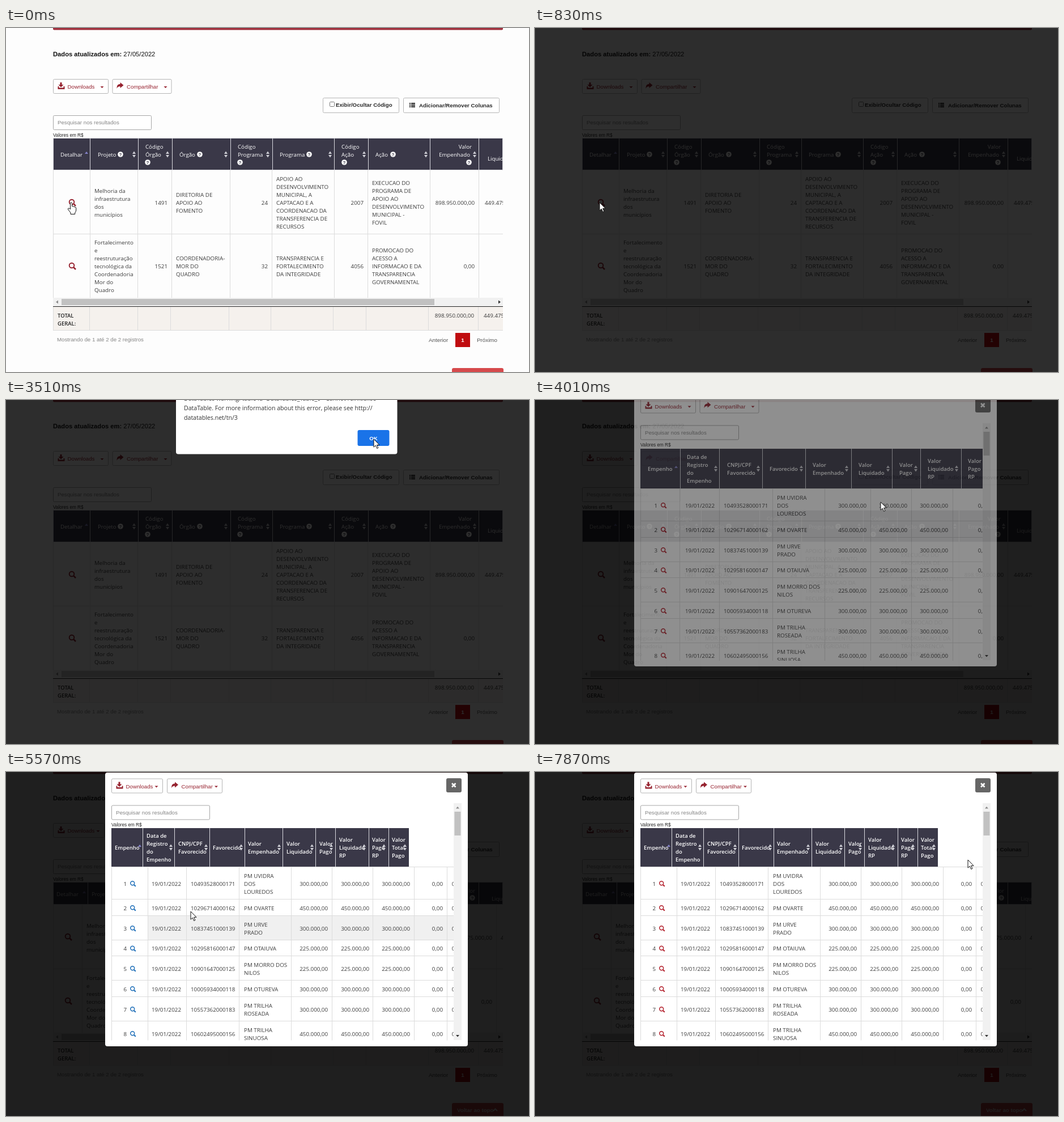
These frames come from a looping animation (923 px wide and 607 px high, 7990 ms). An HTML page:

```html
<!DOCTYPE html>
<html lang="pt-BR">
<head>
<meta charset="utf-8">
<title>Consulta de despesas</title>
<style>
html, body { margin: 0; width: 100%; height: 100%; overflow: hidden; background: #fdfdfd; }
svg { display: block; width: 923px; height: 607px; }
text { white-space: pre; }
.b { font: 9.8px "Open Sans", "Noto Sans", sans-serif; fill: #3c3c3c; }
.h { font: 500 9.7px "Open Sans", "Noto Sans", sans-serif; fill: #fff; }
.m { font: 600 9.5px "Open Sans", "Noto Sans", sans-serif; fill: #fff; }
.tot { font: 600 9.5px "Open Sans", "Noto Sans", sans-serif; fill: #222; }
.al { font: 10.6px "Open Sans", "Noto Sans", sans-serif; fill: #333; }
.q { font: bold 8px "Liberation Sans", Arial, sans-serif; fill: #3a3848; }
.d { font: 11.2px "Liberation Sans", Arial, sans-serif; fill: #111; }
.btn { font: 9.7px "Liberation Sans", Arial, sans-serif; fill: #96222f; }
.bold { font: bold 9.7px "Liberation Sans", Arial, sans-serif; fill: #2a2a2a; }
.grey { font: 9.7px "Liberation Sans", Arial, sans-serif; fill: #858585; }
.pg { font: 9.8px "Liberation Sans", Arial, sans-serif; fill: #555; }
.sm { font: 8.2px "Liberation Sans", Arial, sans-serif; fill: #222; }
.w { font: bold 9.7px "Liberation Sans", Arial, sans-serif; fill: #fff; }
</style>
</head>
<body>
<svg id="stage" viewBox="0 0 923 607" xmlns="http://www.w3.org/2000/svg"></svg>
<script>
const LOOP = 7990, WINE = '#96222f', DARK = '#3a3848', LINE = '#dcdcdc', RULE = '#d8d8de';

// ---- drawing helpers ----
const rect = (x, y, w, h, fill, more = '') =>
  `<rect x="${x}" y="${y}" width="${w}" height="${h}" fill="${fill}" ${more}/>`;
const path = (d, fill, more = '') => `<path d="${d}" fill="${fill}" ${more}/>`;
const group = (id, body, more = '') => `<g id="${id}" ${more}>${body}</g>`;
const vlines = (xs, y1, y2, color) =>
  path(xs.map(x => `M${x} ${y1}V${y2}`).join(''), 'none', `stroke="${color}"`);
const hline = (x1, x2, y, color) => path(`M${x1} ${y}H${x2}`, 'none', `stroke="${color}"`);

// y is the middle of the first line; "|" splits lines
function text(x, y, str, cls, anchor = 'start', step = 14) {
  return str.split('|').map((s, i) =>
    `<text x="${x}" y="${y + i * step + 3.5}" class="${cls}" text-anchor="${anchor}">${s}</text>`).join('');
}
const right = (x, y, str, cls = 'b') => text(x, y, str, cls, 'end');
const mid = (x, y, str, cls) => text(x, y, str, cls, 'middle');

const box = (x, y, w, h, stroke = '#b5b5b5') =>
  rect(x + .5, y + .5, w - 1, h - 1, '#fff', `rx="2" stroke="${stroke}"`);
const caret = (x, y) => path(`M${x - 3} ${y - 1.5}h6l-3 3z`, WINE);
const help = (x, y) => `<circle cx="${x}" cy="${y}" r="4.8" fill="#fff"/>` + mid(x, y - .6, '?', 'q');
const sort = (x, y) => path(`M${x - 3} ${y - 1}h6l-3 -4.5zM${x - 3} ${y + 1}h6l-3 4.5z`, '#cfcfd6');
const sortUp = (x, y) => path(`M${x - 3} ${y}h6l-3 -4z`, '#8583c9');
const lens = (x, y, k, color) =>
  `<g transform="translate(${x} ${y}) scale(${k})" fill="none" stroke="${color}">
  <circle cx="-1" cy="-1" r="4.3" stroke-width="1.9"/><path d="M2.4 2.4L6 6" stroke-width="2.5"/></g>`;

function buttons(x, y, tight) {
  const cut = tight ? 7 : 0, x2 = x + 104.5 - cut + (tight ? .5 : 0);
  return box(x, y, 98 - cut, 26) + box(x2, y, 105 - cut, 26)
    + path(`M${x + 12.5} ${y + 6}h3v4h3l-4.500 4.500l-4.500-4.500h3z`, WINE)
    + path(`M${x + 8.500} ${y + 13}v5h12v-5h-2v2.500h-8v-2.500z`, WINE)
    + text(x + 25.5, y + 13.5, 'Downloads', 'btn') + caret(x + 86.5 - cut, y + 14.5)
    + path(`M${x2 + 8} ${y + 17}c0-6 2-8 6-8v-3l6 5l-6 5v-3c-3 0-5 1-6 4z`, WINE)
    + text(x2 + 25.5, y + 13.5, 'Compartilhar', 'btn') + caret(x2 + 94 - cut, y + 14.5);
}
const search = (x, y) => box(x, y, 174, 26, '#a6a6a6') + text(x + 8, y + 12.5, 'Pesquisar nos resultados', 'grey')
  + text(x, y + 34, 'Valores em R$', 'sm');

// ---- main page ----
const PROJ = ['Melhoria da|infraestrutura|dos|municípios',
  'Fortalecimento|e|reestruturação|tecnológica da|Coordenadoria|Mor do|Quadro'];

// label, x, y, help x, help y, sort x
const HEAD = [
  ['Projeto', 162, 223, 202, 223, 226],
  ['Código|Órgão', 246, 209, 250, 237, 285],
  ['Órgão', 306, 223, 342, 223, 388],
  ['Código|Programa', 409, 209, 413, 237, 462],
  ['Programa', 483, 223, 535, 223, 572],
  ['Código|Ação', 592, 209, 597, 237, 632],
  ['Ação', 652, 223, 683, 223, 741]
];
const headBar = h => rect(83.5, 194.5, 793, h, DARK, `stroke="${RULE}"`);

function wideTable() {
  const cols = [148.5, 232.5, 292.5, 395.5, 469.5, 579.5, 638.5, 748.5, 834.5];
  let s = headBar(56) + vlines([148.5, 233.5, 293.5, 396.5, 470.5, 579.5, 639.5, 748.5, 834.5], 195, 250, RULE)
    + text(96, 223, 'Detalhar', 'h') + sortUp(142, 222);
  for (const [label, x, y, hx, hy, sx] of HEAD) s += text(x, y, label, 'h') + help(hx, hy) + sort(sx, 223);
  s += right(822, 209, 'Valor', 'h') + right(819, 223, 'Empenhado', 'h') + help(817, 237) + sort(827, 223)
    + text(850, 230, 'Liquidado', 'h') + vlines([83.5, ...cols], 251, 476, LINE) + hline(83, 878, 363.5, LINE);
  s += lens(117, 308, 1, WINE) + lens(117, 420, 1, WINE)
    + text(156, 287, PROJ[0], 'b') + text(156, 378.5, PROJ[1], 'b')
    + right(285, 308, '1491') + right(285, 420, '1521')
    + text(300, 294, 'DIRETORIA DE|APOIO AO|FOMENTO', 'b') + text(300, 406, 'COORDENADORIA-|MOR DO|QUADRO', 'b')
    + right(462, 308, '24') + right(462, 420, '32')
    + text(477, 266, 'APOIO AO|DESENVOLVIMENTO|MUNICIPAL, A|CAPTACAO E A|COORDENACAO DA|TRANSFERENCIA DE|RECURSOS', 'b')
    + text(477, 406, 'TRANSPARENCIA E|FORTALECIMENTO|DA INTEGRIDADE', 'b')
    + right(631, 308, '2007') + right(631, 420, '4056')
    + text(646, 273, 'EXECUCAO DO|PROGRAMA DE|APOIO AO|DESENVOLVIMENTO|MUNICIPAL -|FOVIL', 'b')
    + text(646, 392, 'PROMOCAO DO|ACESSO A|INFORMACAO E DA|TRANSPARENCIA|GOVERNAMENTAL', 'b')
    + right(827, 308, '898.950.000,00') + right(827, 420, '0,00') + text(845, 308, '449.475.000,00', 'b');
  return s;
}

function tightTable() {
  return headBar(39) + vlines([144.5, 834.5], 195, 233, RULE)
    + text(89, 215, 'Detalhar', 'h') + sortUp(138, 214) + text(151, 215, 'Projeto', 'h')
    + right(828, 209, 'Valor', 'h') + help(823, 222) + text(857, 223, 'Liquidado', 'h')
    + vlines([83.5, 134.5, 865.5], 234, 460, LINE) + hline(83, 878, 347.5, LINE)
    + lens(110, 291, 1, WINE) + lens(110, 404, 1, WINE)
    + text(142, 271, PROJ[0], 'b') + text(142, 363, PROJ[1], 'b')
    + right(858, 292, '449.475.000,00') + right(858, 405, '0,00') + text(873, 292, '449.475.000,00', 'b');
}

function footer() {
  return rect(83, 476, 795, 15, '#f1f1f1') + rect(98, 478, 658, 11, '#c1c1c1')
    + path('M92 480.500v6l-4-3z', '#8a8a8a') + path('M869 480.500v6l4-3z', '#333')
    + rect(83, 491, 795, 43, '#f5f1ed') + hline(83, 878, 491.5, '#222') + hline(83, 878, 533.5, LINE)
    + vlines([83.5, 147.5, 232.5, 290.5, 393.5, 467.5, 577.5, 635.5, 745.5, 833.5], 492, 534, LINE)
    + text(91, 507, 'TOTAL|GERAL:', 'tot')
    + right(826, 507, '898.950.000,00') + text(843, 507, '449.475.000,00', 'b');
}

function page(id, tight) {
  const list = [0, 3, 6].map(i => rect(712, 132 + i, 2, 2, '#222') + rect(715, 132 + i, 7, 2, '#222')).join('');
  const up = tight ? -16 : 0;
  return group(id, rect(0, 0, 923, 607, '#fdfdfd')
    + rect(83, -6, 794, 9.5, '#a0303d', 'rx="2"')
    + text(83, 46.5, '<tspan font-weight="bold">Dados atualizados em:</tspan> 27/05/2022', 'd')
    + buttons(83, 90, tight)
    + box(559, 123, 135, 27) + rect(571.5, 130.5, 8, 8, '#fff', 'stroke="#777" rx="1"')
    + text(582, 135.5, 'Exibir/Ocultar Código', 'bold')
    + box(701, 123, 170, 27) + list + text(729, 136, 'Adicionar/Remover Colunas', 'bold')
    + search(83, 154)
    + `<g clip-path="url(#pageClip)">${tight ? tightTable() : wideTable()}<g transform="translate(0 ${up})">${footer()}</g></g>`
    + `<g transform="translate(0 ${up})">`
    + text(90, 549.5, 'Mostrando de 1 até 2 de 2 registros', 'grey')
    + text(746, 550, 'Anterior', 'pg') + text(831, 550, 'Próximo', 'pg')
    + rect(793, 538, 26, 25, '#c00c10') + mid(806, 550, '1', 'w')
    + rect(787, 600, 91, 25, '#d64a4c', 'rx="3"')
    + text(796, 612, 'Voltar ao topo', 'w') + path('M860 614l3.500-3.500l3.500 3.500', 'none', 'stroke="#fff" stroke-width="2"')
    + '</g>');
}

// ---- detail window ----
// name, id number, value in thousands
const ROWS = [
  ['PM UVIDRA|DOS|LOUREDOS', '10493528000171', 300], ['PM OVARTE', '10296714000162', 450],
  ['PM URVE|PRADO', '10837451000139', 300], ['PM OTAIUVA', '10295816000147', 225],
  ['PM MORRO DOS|NILOS', '10901647000125', 225], ['PM OTUREVA', '10005934000118', 300],
  ['PM TRILHA|ROSEADA', '10557362000183', 300], ['PM TRILHA|SINUOSA', '10602495000156', 450]
];
const HEIGHTS = [57, 29, 43, 28, 43, 29, 43, 43];
const TITLES = ['Empenho', 'Data de|Registro|do|Empenho', 'CNPJ/CPF|Favorecido', 'Favorecido', 'Valor|Empenhado',
  'Valor|Liquidado', 'Valor|Pago', 'Valor|Liquidado|RP', 'Valor|Pago|RP', 'Valor|Total|Pago'];

const WIDE = {
  id: 'wide', top: -14, end: 790, head: [86, 70], body: 157,
  heads: [256.5, 325.5, 401.5, 477.5, 558.5, 630.5, 680.5, 752.5],
  titles: [199, 268, 339, 414, 490, 571, 643, 693, 764],
  sorts: [249, 319, 394, 470, 550, 623, 672, 744, 795],
  cols: [255.5, 325.5, 419.5, 511.5, 592.5, 664.5, 737.5],
  num: 216, date: 265, doc: 333, name: 427, vals: [585, 657, 729], zeros: [801]
};
const TIGHT = {
  id: 'tight', top: 0, end: 711, head: [99, 68], body: 168,
  heads: [241.5, 297.5, 359.5, 421.5, 488.5, 546.5, 581.5, 640.5, 675.5],
  titles: [192, 248, 304, 365, 427, 495, 553, 588, 646, 681],
  sorts: [236, 291, 353, 415, 482, 540, 574, 632, 667, 704],
  cols: [250.5, 318.5, 411.5, 503.5, 575.5, 647.5, 720.5, 778.5],
  num: 213, date: 257, doc: 326, name: 420, vals: [568, 641, 713], zeros: [771, 806]
};

function modal(L) {
  const y0 = L.top, [hy, hh] = L.head, cy = hy + hh / 2;
  let head = rect(186, hy, L.end - 186, hh, DARK) + vlines(L.heads, hy, hy + hh, RULE);
  L.titles.forEach((x, i) => {
    const n = TITLES[i].split('|').length;
    head += text(x, cy - (n - 1) * 7, TITLES[i], 'm') + (i ? sort(L.sorts[i], cy) : sortUp(L.sorts[0], cy - 1));
  });
  let y = L.body, rows = hline(186, 790, y - .5, LINE);
  ROWS.forEach(([name, doc, k], i) => {
    const h = HEIGHTS[i], c = y + h / 2 + .5, n = name.split('|').length;
    rows += rect(L.cols[0], y, 790 - L.cols[0], h, '#f0f0f0', `data-row="${i + 1}"`)
      + right(L.num, c, String(i + 1)) + lens(L.num + 11, c, .8, 'currentColor')
      + text(L.date, c, '19/01/2022', 'b') + text(L.doc, c, doc, 'b') + text(L.name, c - (n - 1) * 7, name, 'b')
      + L.vals.map(x => right(x, c, k + '.000,00')).join('') + L.zeros.map(x => right(x, c, '0,00')).join('')
      + hline(186, 790, y + h - .5, LINE);
    y += h;
  });
  rows += vlines([186.5, ...L.cols], L.body, 480, LINE);
  return group(L.id,
    rect(175, y0 + 1, 640, 483, '#fff', 'rx="4"') + buttons(186, y0 + 11.5, L === TIGHT)
    + rect(777, y0 + 11, 27, 25, '#666', 'rx="3"')
    + path(`M787 ${y0 + 20}l6.500 6.500m0 -6.500l-6.500 6.500`, 'none', 'stroke="#fff" stroke-width="2.6"')
    + search(186, y0 + 58.5)
    + `<g clip-path="url(#${L.id}Clip)">${rows}${head}</g>`
    + rect(790, y0 + 55, 14, 418, '#f1f1f1') + rect(791.5, y0 + 70, 11, 42, '#c1c1c1')
    + path(`M794 ${y0 + 64.5}h6l-3-3.500z`, '#8a8a8a') + path(`M794 ${y0 + 464}h6l-3 3.500z`, '#333'));
}

// ---- alert and pointers ----
const alertBox = () => group('alert', rect(300, -60, 390.5, 155.5, '#fff', 'rx="4"')
  + text(314, -3, 'DataTables warning: table id=DataTables_Table_0 - Cannot reinitialise|DataTable. For more information about this error, please see http://|datatables.net/tn/3', 'al', 'start', 17.2)
  + rect(620, 52, 57, 30, '#fff', 'id="ring" rx="4" stroke="#1a66cc" stroke-width="2"')
  + rect(620.5, 53, 56, 28, '#1a73e8', 'id="ok" rx="3"') + mid(648.5, 67, 'OK', 'w'));

const pointers = () => group('cursor',
  path('M0 0V14.200L3.300 11.200L5.700 16.500L7.900 15.500L5.600 10.300H10Z', '#fff', 'id="arrow" stroke="#111"')
  + path('M-1.500 9V1.500a1.500 1.500 0 0 1 3 0V6.500q2.500-1 2.700 .8q2.300-.8 2.500 1q2-.4 2 1.500V13q0 3-2 5v2.500H-1V18L-5.500 12q-.5-2 1.200-2q1.500 0 2.800 2z',
    '#fff', 'id="hand" stroke="#111"')
  + path('M-3 -7.500q3 0 3 1.500q0-1.500 3-1.500M0-6V6M-3 7.500q3 0 3-1.500q0 1.500 3 1.500', 'none', 'id="beam" stroke="#222" stroke-width="1.2"'));

const clip = (id, x, y, w, h) => `<clipPath id="${id}">${rect(x, y, w, h, '#fff')}</clipPath>`;
const stage = document.getElementById('stage');
stage.innerHTML = '<defs>' + clip('pageClip', 83, 190, 794, 345)
  + clip('wideClip', 186, 80, 604, 380) + clip('tightClip', 186, 95, 604, 378.5) + '</defs>'
  + page('page', false) + page('pageTight', true)
  + rect(0, 0, 923, 607, '#000', 'id="shade"') + alertBox() + modal(WIDE) + modal(TIGHT) + pointers();

// ---- timeline ----
const CURSOR = [
  [0, 'hand', 115, 308], [710, 'arrow', 114, 308], [2610, 'arrow', 132, 295],
  [2750, 'arrow', 230, 250], [2870, 'arrow', 400, 165], [3000, 'arrow', 560, 95], [3120, 'arrow', 643, 64],
  [3260, 'arrow', 649, 69], [4010, 'arrow', 610, 180], [4160, 'beam', 568, 246], [4280, 'beam', 530, 249],
  [4410, 'beam', 480, 253], [4530, 'beam', 440, 255], [4650, 'beam', 410, 257], [4770, 'beam', 392, 257],
  [5310, 'arrow', 387, 250], [5570, 'arrow', 326, 246], [5700, 'arrow', 270, 230], [5850, 'arrow', 202, 181],
  [5990, 'arrow', 192, 160], [6110, 'arrow', 201, 143], [6260, 'arrow', 330, 150], [6380, 'arrow', 501, 150],
  [6530, 'arrow', 620, 142], [6660, 'arrow', 727, 130], [6800, 'arrow', 700, 109], [6930, 'arrow', 751, 118],
  [7070, 'arrow', 745, 196], [7210, 'arrow', 770, 160], [7340, 'arrow', 779, 115], [7480, 'arrow', 711, 113],
  [7610, 'arrow', 784, 153], [7730, 'arrow', 743, 122], [7870, 'arrow', 764, 155]
];
const SHADE = [[0, 0], [710, .3], [830, .82], [4010, .88]];
const HOVER = [[0, 0], [4160, 1], [4280, 2], [4650, 3], [5700, 2], [5850, 1], [5990, 0], [7070, 1], [7210, 0]];
const ALERT = [[0, 0], [1620, .88], [1770, 1], [3640, .5], [3760, 0]];
const MODAL = [[0, 0], [4010, .5], [4160, 1]];

const at = (steps, t) => steps.findLast(s => s[0] <= t);
const $ = id => document.getElementById(id);
const show = (id, on) => $(id).setAttribute('display', on ? 'inline' : 'none');
const set = (id, name, v) => $(id).setAttribute(name, v);
const hoverRects = [...stage.querySelectorAll('[data-row]')];

function draw(t) {
  const tight = t >= 4910;
  show('page', !tight);
  show('pageTight', tight);
  set('shade', 'opacity', at(SHADE, t)[1]);

  const a = at(ALERT, t)[1];
  show('alert', a > 0);
  set('alert', 'opacity', a);
  set('alert', 'transform', a < 1 ? 'translate(495 -5) scale(1.006 1) translate(-495 0)' : '');
  show('ring', t < 3260);

  const m = at(MODAL, t)[1];
  show('wide', m > 0 && !tight);
  show('tight', tight);
  set('wide', 'opacity', m);
  set('wide', 'transform', `translate(0 ${t >= 4280 ? 14 : 0})`);
  set('wide', 'color', '#b3202c');
  set('tight', 'color', t >= 5160 && t < 5990 ? '#1f6fb8' : '#b3202c');
  const row = at(HOVER, t)[1];
  for (const r of hoverRects) r.setAttribute('opacity', +r.dataset.row === row ? 1 : 0);

  const [, kind, x, y] = at(CURSOR, t);
  set('cursor', 'transform', `translate(${x} ${y})`);
  for (const k of ['arrow', 'hand', 'beam']) show(k, k === kind);
}

const start = performance.now();
function tick() {
  draw((performance.now() - start) % LOOP);
  requestAnimationFrame(tick);
}
tick();
</script>
</body>
</html>
```
